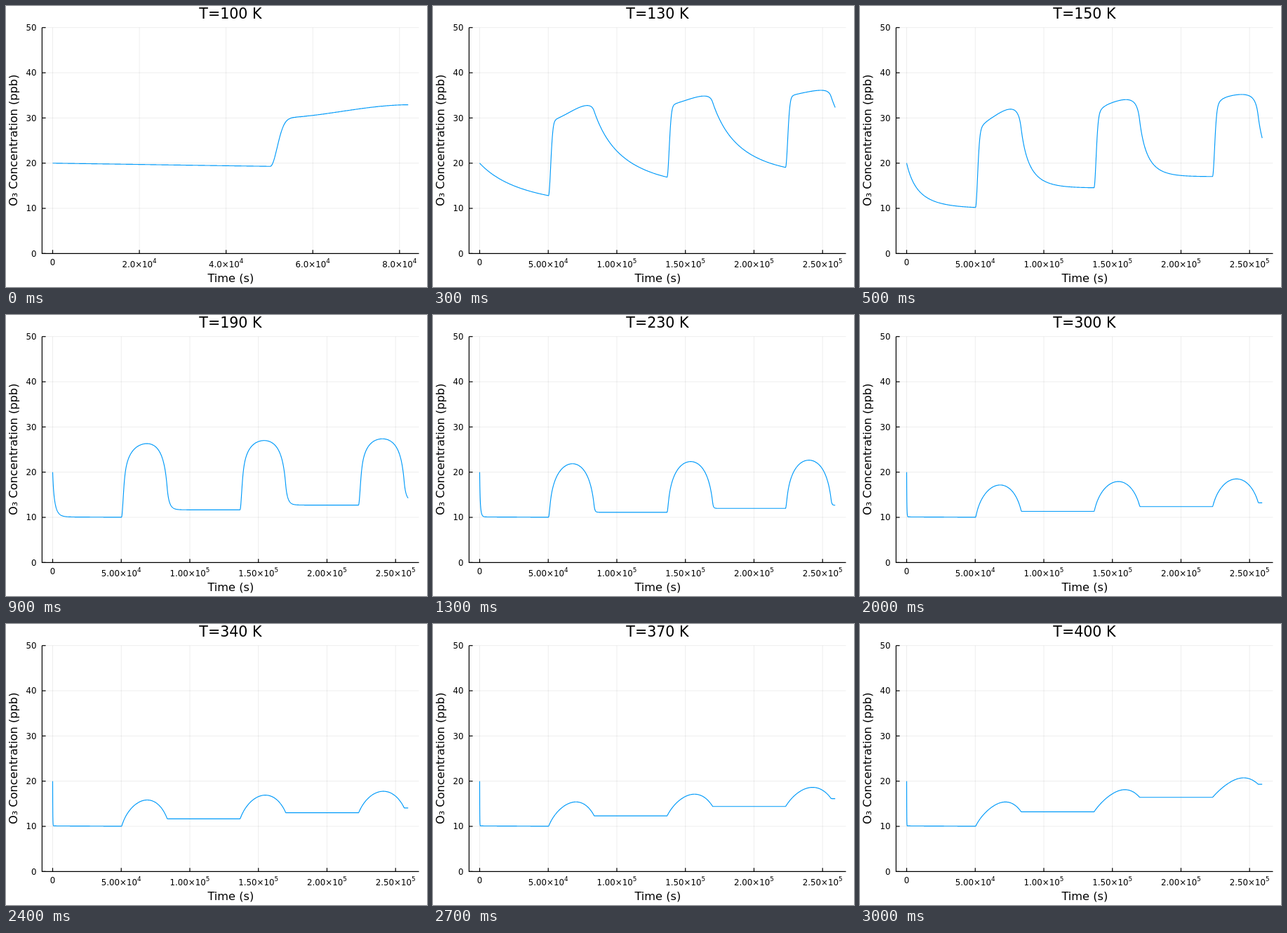
Write an HTML page that moves like this. It is 600x400 px and loops after 3.1 s.

```html
<!DOCTYPE html>
<html lang="en">
<head>
<meta charset="utf-8">
<title>Ozone concentration by temperature</title>
<style>
  html, body { margin: 0; width: 100%; height: 100%; overflow: hidden; background: #fff; }
  svg { display: block; width: 600px; height: 400px; font-family: "DejaVu Sans", sans-serif; }
  text { fill: #000; font-size: 11.8px; text-anchor: middle; }
  .grid { stroke: #000; stroke-opacity: .1; stroke-width: .7; fill: none; }
  .axis { stroke: #000; stroke-width: 1.2; fill: none; }
  .guide { font-size: 16.2px; }
  .title { font-size: 20.6px; }
  .sup { font-size: 8.8px; }
  .end { text-anchor: end; }
  #curve { stroke: #009af9; stroke-width: 1.15; fill: none; stroke-linejoin: round; }
</style>
</head>
<body>
<svg viewBox="0 0 600 400">
  <g id="yaxis"></g>
  <g id="xaxis"></g>
  <path id="curve"/>
  <path class="axis" d="M51.4 30.7V352.4H588.5"/>
  <text id="title" class="title" x="319.9" y="18"></text>
  <text class="guide" x="320.3" y="393.4">Time (s)</text>
  <text class="guide" transform="translate(16.2 191.3) rotate(-90)">O₃ Concentration (ppb)</text>
</svg>
<script>
const STEP = 100, COUNT = 31;
const LEFT = 51.4, RIGHT = 588.5, X0 = 66.5, WIDTH = 506.7, TOP = 30.7, BASE = 352.4;
const DAY = 86400, SUNRISE = 50200, DAYLIGHT = 33250;
const J_MAX = 4.1e-3;      // noon photolysis rate, 1/s
const NOX = 20, LOSS = 0.7; // ppb, ppb per day

// Temperature, then net ozone gain (ppb) for each of three days
const GAIN = [
  [100, 3.7, 3.0, 2.4],
  [150, 4.5, 2.5, 1.6],
  [190, 1.65, 1.05, 0.9],
  [230, 1.1, 0.87, 0.68],
  [270, 1.1, 0.88, 0.68],
  [340, 1.65, 1.35, 1.05],
  [400, 3.2, 3.2, 2.9]
];

const $ = id => document.getElementById(id);
const yAt = v => BASE - 6.434 * v;
const endTime = T => T === 100 ? 82000 : 259200;

function gains(T) {
  let i = 0;
  while (i < GAIN.length - 2 && T > GAIN[i + 1][0]) i++;
  const a = GAIN[i], b = GAIN[i + 1], f = (T - a[0]) / (b[0] - a[0]);
  return [1, 2, 3].map(n => a[n] * (b[n] / a[n]) ** f);
}

// Rate of NO + O3 in 1/(ppb s) at constant pressure
const rate = T => 3e-12 * Math.exp(-1500 / T) * 7.246e12 / T;

function ozonePath(T) {
  const k = rate(T), g = gains(T), end = endTime(T), dt = 50;
  let no = 9.9, d = 'M' + X0 + ' ' + yAt(20).toFixed(2);
  for (let n = 1; n * dt <= end; n++) {
    const t = n * dt;
    let excess = 10.1 - 0.08 * Math.min(1, t / SUNRISE), nox = NOX, j = 0, growth = 0;
    g.forEach((gain, day) => {
      const u = Math.min(1, Math.max(0, (t - SUNRISE - day * DAY) / DAYLIGHT));
      const done = (1 - Math.cos(Math.PI * u)) / 2, sun = Math.sin(Math.PI * u);
      excess += gain * done;
      nox -= LOSS * done;
      if (u > 0 && u < 1) {
        j = J_MAX * sun;
        growth = gain * sun * Math.PI / (2 * DAYLIGHT);
      }
    });
    const slope = j * (nox - no) - k * no * (no + excess) - growth;
    const decay = j + k * (2 * no + excess);
    no += slope * (1 - Math.exp(-decay * dt)) / decay;
    if (n % 4 === 0 || n < 20)
      d += 'L' + (X0 + WIDTH * t / end).toFixed(2) + ' ' + yAt(no + excess).toFixed(2);
  }
  return d;
}

function yAxis() {
  let out = '';
  for (let v = 0; v <= 50; v += 10) {
    const y = yAt(v);
    out += `<path class="grid" d="M${LEFT} ${y}H${RIGHT}"/>` +
      `<path class="axis" d="M${LEFT} ${y}h5.2"/>` +
      `<text class="end" x="43.6" y="${y + 4.3}">${v}</text>`;
  }
  return out;
}

function xAxis(end) {
  const short = end < 1e5, step = short ? 2e4 : 5e4;
  let out = '';
  for (let t = 0; t <= end; t += step) {
    const x = X0 + WIDTH * t / end, power = t < 1e5 ? 4 : 5;
    const base = (t / 10 ** power).toFixed(short ? 1 : 2);
    out += `<path class="grid" d="M${x} ${TOP}V${BASE}"/>` +
      `<path class="axis" d="M${x} ${BASE}v-5.2"/>`;
    out += t === 0
      ? `<text x="${x}" y="368.8">0</text>`
      : `<text x="${x}" y="372.4">${base}×10<tspan class="sup" dy="-6">${power}</tspan></text>`;
  }
  return out;
}

const frames = Array.from({ length: COUNT }, (_, i) => {
  const T = 100 + 10 * i;
  return { T, path: ozonePath(T), end: endTime(T) };
});

let shown = -1, axisEnd = 0;
function draw(now) {
  const i = Math.floor(now / STEP) % COUNT;
  if (i !== shown) {
    const { T, path, end } = frames[i];
    $('title').textContent = `T=${T} K`;
    $('curve').setAttribute('d', path);
    if (end !== axisEnd) $('xaxis').innerHTML = xAxis(axisEnd = end);
    shown = i;
  }
}

$('yaxis').innerHTML = yAxis();
draw(0);
let start;
requestAnimationFrame(function tick(now) {
  start ??= now;
  draw(now - start);
  requestAnimationFrame(tick);
});
</script>
</body>
</html>
```
